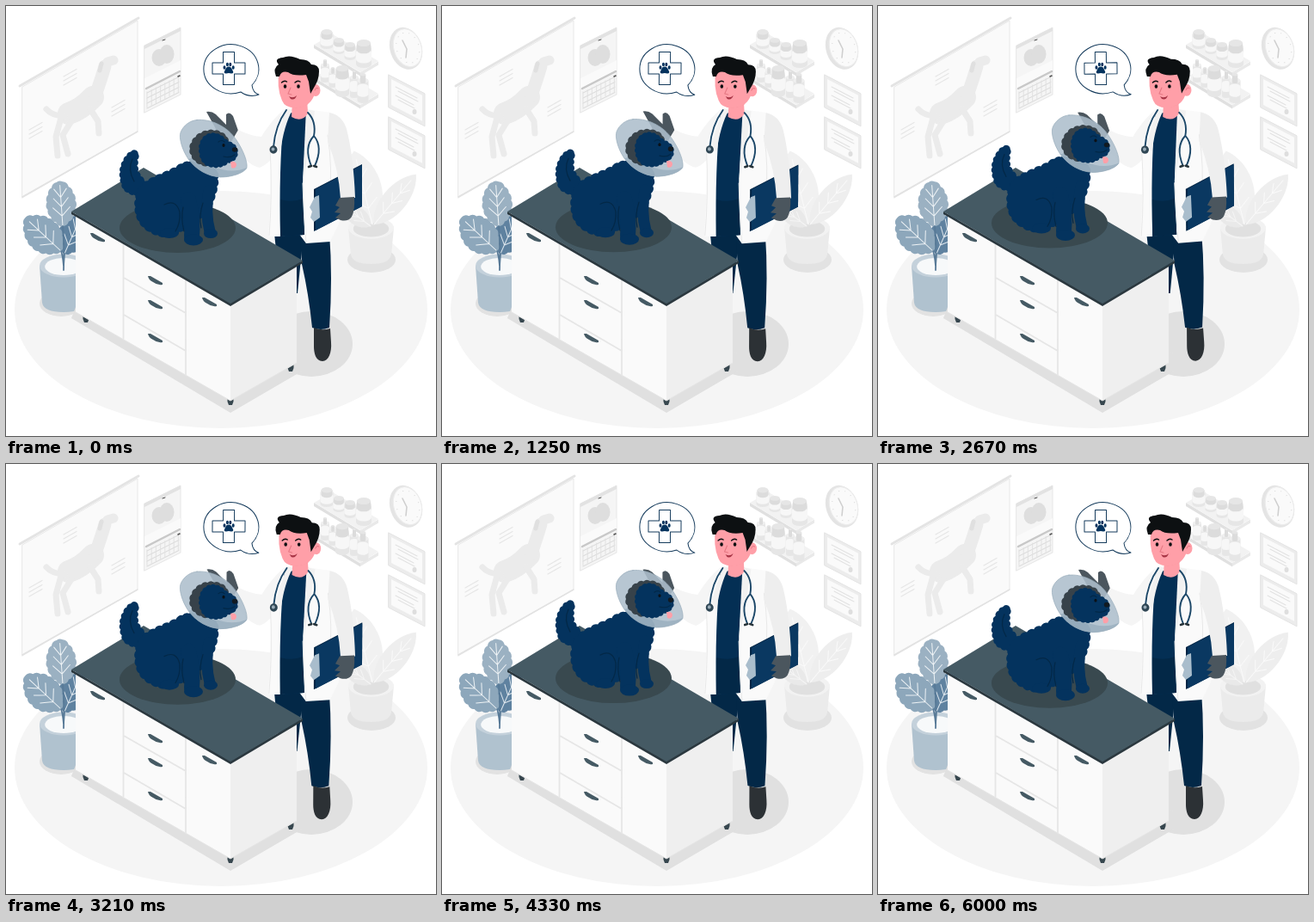
Recreate the animation shown at these times as an HTML page. Size 500 px wide and 500 px high, loop 6.04 s.

```html
<!DOCTYPE html>
<html lang="en">
<head>
<meta charset="utf-8">
<title>At the vet</title>
<style>
html, body { margin: 0; width: 100%; height: 100%; overflow: hidden; background: #fff; }
svg { display: block; width: 100vw; height: 100vh; }
</style>
</head>
<body>
<svg id="stage" viewBox="0 0 500 500" fill="none" stroke-linecap="round" stroke-linejoin="round"></svg>
<script>
const NAVY = '#04335e', DEEP = '#032847', SHIRT = '#042f54', SLATE = '#455a64', EDGE = '#2b383f';
const GLOVE = '#4b565e', SKIN = '#ff9fa8', HAIR = '#0d1012';

const stage = document.getElementById('stage');
const path = (d, fill, extra = '') => `<path d="${d}" fill="${fill}" ${extra}/>`;
const line = (d, color, width = 1) => `<path d="${d}" stroke="${color}" stroke-width="${width}"/>`;
const poly = (points, fill, extra = '') => `<polygon points="${points}" fill="${fill}" ${extra}/>`;
const oval = (x, y, rx, ry, fill, extra = '') => `<ellipse cx="${x}" cy="${y}" rx="${rx}" ry="${ry}" fill="${fill}" ${extra}/>`;
const edge = (color, width = 1) => `stroke="${color}" stroke-width="${width}"`;
const group = (transform, content) => `<g transform="${transform}">${content}</g>`;
const repeat = (n, draw) => Array.from({ length: n }, (_, i) => draw(i)).join('');

// Follows a clockwise outline with rounded tufts of about the given size.
function tufted(d, size, fill) {
  const outline = document.createElementNS('http://www.w3.org/2000/svg', 'path');
  outline.setAttribute('d', d);
  const length = outline.getTotalLength(), n = Math.round(length / size), r = size * 0.75;
  const at = i => {
    const { x, y } = outline.getPointAtLength(i * length / n);
    return `${x.toFixed(1)} ${y.toFixed(1)}`;
  };
  return path(`M${at(0)}${repeat(n, i => `A${r} ${r} 0 0 1 ${at(i + 1)}`)}Z`, fill);
}

// Panel on the wall, seen at an angle: dx to the right, slope down per unit.
const panel = (x, y, w, h, slope, fill, extra) =>
  poly(`${x},${y} ${x + w},${y + w * slope} ${x + w},${y + w * slope + h} ${x},${y + h}`, fill, extra);

function leaf(x, y, length, width, angle, fill, vein, tuft) {
  const w = width * 0.67;
  const d = `M0 0C${-w} ${-length * 0.2} ${-w} ${-length * 0.75} 0 ${-length}C${w} ${-length * 0.75} ${w} ${-length * 0.2} 0 0Z`;
  const veins = repeat(3, i => {
    const v = -length * (0.22 + i * 0.2), reach = width * (0.3 - i * 0.04);
    return `M${-reach} ${v - 10}L0 ${v}L${reach} ${v - 10}`;
  });
  return group(`translate(${x} ${y}) rotate(${angle})`,
    (tuft ? tufted(d, tuft, fill) : path(d, fill)) + line(`M0 0V${-length * 0.88}${veins}`, vein));
}

function poster() {
  const fur = '#ebebeb';
  const note = (x, y) => repeat(3, i => line(`M${x} ${y + i * 5}l15 -8.5`, '#e6e6e6', 1.2));
  return panel(19, 94, 134, 129, -0.575, '#fafafa', edge('#e8e8e8'))
    + line('M16 93L154 14', '#e4e4e4', 3)
    + line('M19 222L153 146', '#e2e2e2', 1.5)
    + line('M73 125Q88 120 101 106', fur, 26)
    + line('M104 104Q111 84 115 70', fur, 15)
    + line('M118 65L125 63', fur, 11)
    + line('M68 128Q54 128 47 120M64 130L58 152L60 174M76 134L66 150L72 172M98 120L107 134L108 148', fur, 7)
    + line('M111 67L109 75', '#e0e0e0', 5)
    + note(67, 82) + note(27, 144) + note(123, 118);
}

function calendar() {
  return panel(161, 46, 42, 78, -0.5, '#f5f5f5', edge('#e6e6e6'))
    + panel(161, 46, 42, 4, -0.5, '#e2e2e2')
    + oval(178, 60, 8.5, 10, '#dedede') + oval(187, 56, 8.5, 11, '#dedede')
    + line('M182 40l3-1', '#444')
    + panel(161, 84, 42, 12, -0.5, '#fafafa')
    + line('M163 96L202 76', '#c8c8c8', 2.5)
    + repeat(4, i => line(`M164 ${101 + i * 6}l37 -18.500`, '#d9d9d9'))
    + repeat(8, i => line(`M${164 + i * 5.2} ${100 - i * 2.6}v18`, '#e0e0e0', 0.9))
    + line('M200 82l2-1', '#555', 1.6);
}

// Round container standing with its base centre at x, y.
function jar(x, y, w, h, neck) {
  const can = (top, r, tall, side, lid) =>
    path(`M${x - r} ${top}v${tall}a${r} ${r / 2} 0 0 0 ${2 * r} 0v${-tall}Z`, side) + oval(x, top, r, r / 2, lid);
  const r = w / 2, cap = h * 0.25;
  return can(y - h + cap, r, h - cap - r / 2, '#e6e6e6', '#efefef')
    + can(y - h * 0.55, r, h * 0.25, '#f7f7f7', '#f7f7f7')
    + can(y - h + r * neck / 2, r * neck, cap, '#dcdcdc', '#e6e6e6');
}

function shelves() {
  const plank = y => panel(358, y, 54, 4, 0.6, '#e0e0e0')
    + panel(412, y + 32, 21, 4, -0.6, '#e9e9e9')
    + poly(`358,${y} 380,${y - 12} 433,${y + 19} 412,${y + 32}`, '#f2f2f2');
  return plank(45) + jar(373, 50, 15, 23, 0.85) + jar(387, 56, 13, 19, 0.9) + jar(400, 63, 13, 21, 0.9) + jar(416, 72, 18, 33, 0.9)
    + plank(83) + jar(371, 89, 10, 27, 0.4) + jar(380, 95, 9, 24, 0.4) + jar(391, 106, 16, 37, 0.9)
    + jar(405, 107, 10, 32, 0.4) + jar(415, 113, 13, 35, 0.5);
}

function diploma(y) {
  return panel(445, y, 42, 38, 0.52, '#ececec', edge('#e4e4e4'))
    + panel(448, y + 5, 36, 30, 0.52, '#fafafa')
    + repeat(4, i => line(`M${453 + i % 2 * 3} ${y + 14 + i * 5}l${25 - i * 2} ${13 - i}`, '#e2e2e2', 1.1))
    + oval(475, y + 43, 2.5, 3, '#dedede');
}

function clock() {
  return group('rotate(-18 466 49)', oval(465, 49, 18.5, 25, '#e4e4e4') + oval(467, 49, 16, 22.5, '#fafafa', edge('#ececec'))
    + repeat(12, i => {
      const a = i * Math.PI / 6;
      return line(`M${467 + 13 * Math.cos(a)} ${49 + 18 * Math.sin(a)}h.5`, '#dedede');
    })) + line('M461 40L466 50L465 60', '#cfcfcf', 1.6);
}

function pot(x, y, r, h, side, rim, soil) {
  return path(`M${x - r} ${y}l3 ${h}Q${x - r + 5} ${y + h + 11} ${x} ${y + h + 11}T${x + r - 3} ${y + h}l3 ${-h}Z`, side)
    + oval(x, y, r, r * 0.48, rim) + oval(x, y + 1, r * 0.78, r * 0.36, soil);
}

function greyPlant() {
  return oval(425, 295, 28, 15, '#e2e2e2')
    + pot(424.5, 258, 26.5, 31, '#ebebeb', '#f2f2f2', '#e0e0e0')
    + leaf(426, 254, 88, 42, -14, '#f1f1f1', '#fafafa')
    + leaf(428, 254, 76, 28, 40, '#eeeeee', '#fafafa')
    + leaf(424, 256, 42, 21, -53, '#e9e9e9', '#f5f5f5');
}

function bluePlant() {
  return oval(64, 346, 25, 15, '#e2e2e2')
    + pot(67, 302, 28, 43, '#b0c2cf', '#c4d1db', '#f7f9fa')
    + leaf(68, 288, 50, 32, 24, '#5f82a0', '#dde6ed', 9)
    + leaf(64, 285, 57, 38, -47, '#8da7bb', '#edf2f5', 9)
    + leaf(66, 256, 54, 33, -4, '#9bb1c2', '#edf2f5', 9)
    + line('M67 307Q68 280 66 256M67 302Q66 290 64 285M67 302L68 288', '#587a97', 1.8);
}

function desk() {
  const handle = (x, y) => path(`M${x} ${y}h3l14 8v2q-6 1-11-3q-5-2-6-7Z`, SLATE);
  const foot = (x, y) => path(`M${x - 3.5} ${y - 4}h7v4l-1.5 4h-4l-1.500-4Z`, '#37474f');
  return poly('76,363 261,473 345,424 345,405 160,330 81,350', '#e0e0e0')
    + foot(93, 364) + foot(261, 460) + foot(331, 421)
    + panel(81, 243, 180, 113, 0.572, '#fafafa')
    + panel(261, 346, 77, 113, -0.572, '#efefef')
    + line('M81 356L261 459L338 415', '#e5e5e5')
    + line('M136.500 277V387M209 319V429M137 316L209 357M137 359L209 401', '#e6e6e6', 1.8)
    + [[98, 264], [165, 314], [165, 342], [165, 381], [228, 339]].map(p => handle(...p)).join('')
    + poly('76,239 261,345 345,296 345,299 261,349 76,242', EDGE)
    + poly('76,239 160,188 345,296 261,346', SLATE);
}

function dog() {
  const cone = 'M222 132.500C237 131 257 139 268 156C276 168 281 181 280 188C278 193 265 199 249 199C235 198 222 191 212 178C204 166 201 153 203 147C206 139 214 133 222 132.500Z';
  return oval(199.5, 258, 67.5, 29, '#39494f')
    + tufted('M137 213Q128 192 139 176Q146 165 155 169Q150 182 154 196Q165 203 162 216Q150 225 137 213Z', 7, NAVY)
    + tufted('M153 216C160 198 192 196 209 180L245 190C248 206 244 216 240 228C236 246 206 256 198 266C188 271 172 267 160 257C149 246 149 230 153 216Z', 9, NAVY)
    + line('M236 215Q231 240 237 262', NAVY, 13) + oval(238, 264.5, 8, 5.5, NAVY)
    + line('M212 225Q218 250 216 268', NAVY, 18) + oval(218, 272, 11, 6.5, NAVY)
    + oval(190, 264, 11, 6, NAVY)
    + line('M184 231Q198 224 202 240Q203 252 197 262M206 234Q203 246 207 262M229 229Q224 244 227 258M147 178Q141 190 149 204', DEEP, 1.2)
    + path(cone, '#aebfcc', 'fill-opacity=".88"')
    + path('M212 178C220 190 234 198 249 199C265 199 278 193 280 188C262 196 238 190 225 174Z', '#92a9bb', 'opacity=".65"')
    + tufted('M214 166Q217 148 236 145Q255 144 259 158L240 186Q216 186 214 166Z', 8, '#37424a')
    + tufted('M225 166C226 144 248 144 256 157Q269 160 269 170Q269 180 258 182Q252 188 243 187Q226 188 225 166Z', 6, NAVY)
    + path('M261 181Q268 180 268 185Q267 190 262 188Z', SKIN)
    + oval(266, 167, 3.2, 2.8, '#111a22') + oval(253, 162, 1.6, 1.9, '#0b1117')
    + line('M247 158Q251 155 254 158M253 175Q261 177 266 173', DEEP, 1.2)
    + path(cone, 'none', edge('#98acbb', 0.7));
}

function legs() {
  return path('M312 264L346 264L339 334L319 334Z', DEEP)
    + path('M342 264H376Q380 315 376 374Q366 378 356 374Q352 335 344 300Z', DEEP)
    + path('M358 374Q367 378 377 375L378 391C379 403 375 413 368 413C360 413 358 403 358 396Z', '#2c3135');
}

function coat() {
  return path('M233 123Q239 122 244 126L256 138L256 126Q260 122 264 128L270 145L271 155L258 158Q246 151 243 141Z', GLOVE)
    + path('M326 119C316 125 305 139 297 152Q284 151 270 144L263 156Q277 184 295 188Q303 185 313 173L334 134Z', '#f5f5f5')
    + path('M322 121Q334 116 350 120L378 124Q392 129 396 145L393 238Q386 257 377 274L349 276L340 264L320 268L305 268Q309 210 307 160Z', '#fafafa')
    + path('M323 128Q334 121 350 124L345 206L347 266L319 268Q317 190 323 128Z', SHIRT)
    + path('M319 225Q333 229 345 224L347 266L319 268Z', DEEP)
    + path('M349 120L359 122L353 162L345 205Z', '#f1f1f1')
    + path('M326 119L333 121Q323 139 319 170L313 160Z', '#f1f1f1')
    + line('M345 206Q346 242 349 275M307 163Q310 220 306 267M374 150Q380 190 376 221', '#e8e8e8');
}

function head() {
  const eye = x => oval(x, 93.5, 1.8, 2.2, HAIR) + line(`M${x - 4} 89q3-3 6-1`, HAIR, 1.4);
  return path('M333 109L350 106L351 125Q344 136 332 129Z', SKIN)
    + path('M334 115Q344 115 351 107V114Q342 119 334 118Z', '#ef858f')
    + path('M318 74H357L360 96Q358 115 341 118Q325 120 321 110Q314 94 318 74Z', SKIN)
    + oval(360, 98, 5.5, 7, SKIN) + line('M359 98q2-4 4-2', '#e57984')
    + path('M314 82Q310 72 317 68Q311 61 322 60Q330 56 342 62Q352 62 355 68Q364 68 364 76Q364 86 358 95L354 102L352 88L349 80Q334 82 328 77Q320 75 318 82Z', HAIR)
    + eye(324.5) + eye(340)
    + line('M331 95l-3 7l4 1', '#e57984', 1.1)
    + path('M329 105Q334 108 338 104Q336 110 331 108Z', '#a73445');
}

function stethoscope() {
  return line('M326 121Q313 139 311 164M351 124Q361 134 358 151M355 186Q346 164 358 151Q369 164 359 186', '#1c4768', 1.9)
    + oval(311, 167, 4.5, 4.7, '#2f4654') + oval(310.5, 166.5, 2, 2.1, '#9aacb8')
    + line('M352 187l3-1M358 186l3 1', '#263238', 2.6);
}

function clipboard() {
  return panel(358, 213, 56, 49, -0.52, '#022444')
    + panel(360, 213, 54, 48, -0.52, '#0a3861')
    + path('M359 222L364 220L365 246L358 251L354 246L356 239L353 234Z', '#a9bdcc')
    + path('M376 124Q391 127 396 143Q404 174 406 223L389 224Q387 190 374 157Z', '#eeeeee')
    + path('M388 223L405 222Q406 237 402 245Q398 251 389 249L383 246L389 241L382 240L388 234L383 232Z', GLOVE);
}

function bubble() {
  const ink = edge('#153b5c');
  return path('M273 100A32 28.500 0 1 1 286 92Q287 101 294 103Q283 107 273 100Z', '#fff', ink)
    + path('M252.500 53.500h13v12.500h12.500v13h-12.500v12.500h-13v-12.500h-12.500v-13h12.500Z', '#fff', ink)
    + path('M259 70.500Q262 70.500 263 74Q266 78.500 262 78.500Q259 77.500 256 78.500Q252 78.500 255 74Q256 70.500 259 70.500Z', NAVY)
    + repeat(4, i => oval(254 + i * 3.4, i % 3 ? 68 : 71.5, 1.5, 2.2, NAVY));
}

stage.innerHTML = oval(250, 353, 240, 138, '#f5f5f5')
  + poster() + calendar() + shelves() + clock() + diploma(80) + diploma(129) + greyPlant()
  + oval(355, 393, 48, 38, '#e0e0e0')
  + `<g id="bubble">${bubble()}</g>`
  + bluePlant()
  + `<g id="doctor">${legs() + coat() + head() + stethoscope() + clipboard()}</g>`
  + desk()
  + `<g id="dog">${dog()}</g>`;

const parts = Object.fromEntries(['bubble', 'doctor', 'dog'].map(id => [id, document.getElementById(id)]));
const LOOP = 6040;

// Triangle wave 0 → 1 → 0 → -1 → 0.
function sway(t, period) {
  const p = t / period % 1;
  return p < 0.25 ? p * 4 : p < 0.75 ? 2 - p * 4 : p * 4 - 4;
}

function draw(t) {
  const angle = sway(t, 3000);
  const lift = t < 1000 ? 0 : 10 * (1 - Math.abs(t - 4000) / 3000);
  parts.doctor.setAttribute('transform', `rotate(${angle} 325 235)`);
  parts.bubble.setAttribute('transform', `rotate(${angle} 260 74)`);
  parts.dog.setAttribute('transform', `translate(0 ${-lift})`);
}

const start = performance.now();
function tick() {
  draw((performance.now() - start) % LOOP);
  requestAnimationFrame(tick);
}
tick();
</script>
</body>
</html>
```
